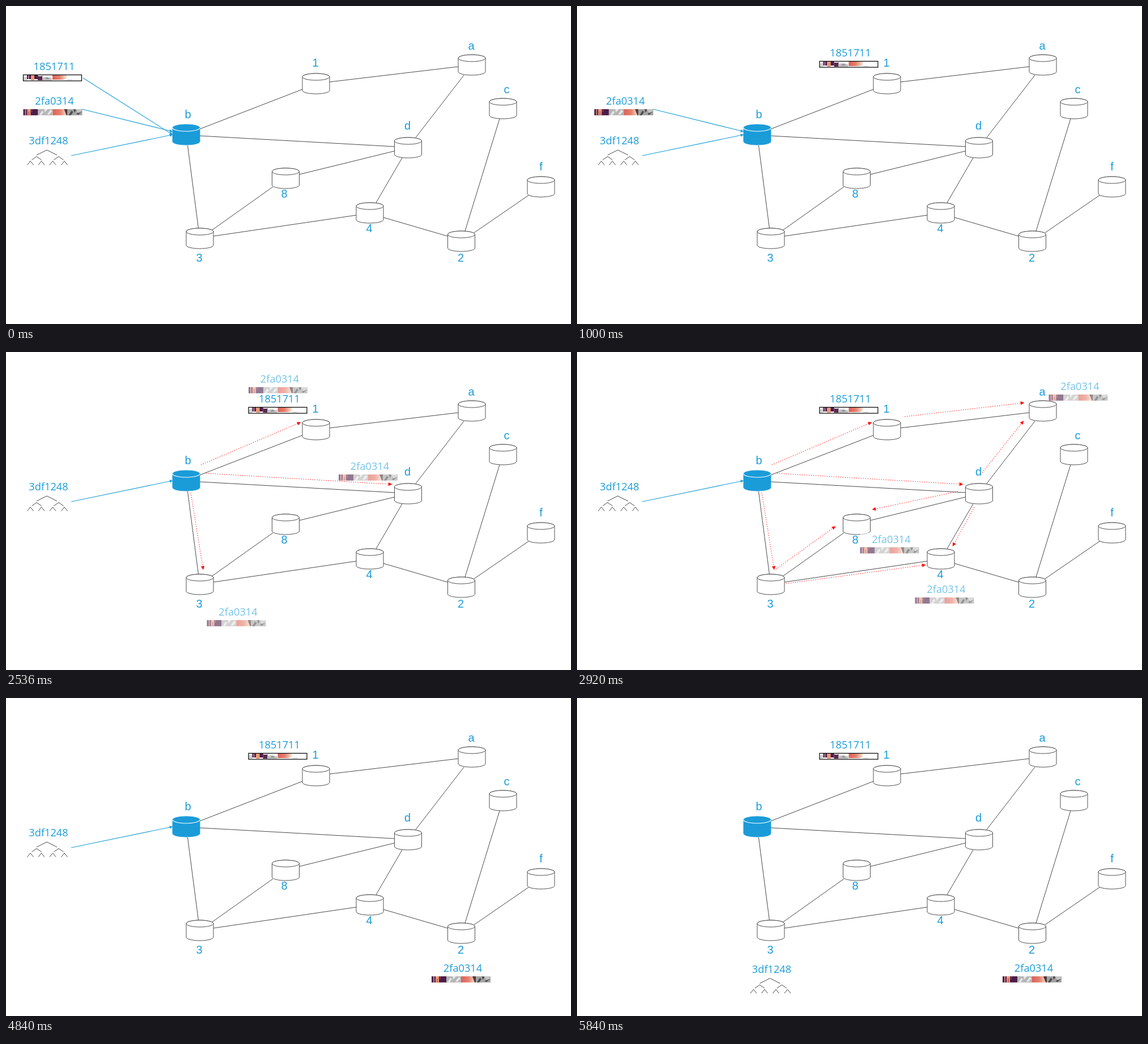
These frames come from a looping animation (997x561 px, 6800 ms). An HTML page:

```html
<!DOCTYPE html>
<html lang="en">
<head>
<meta charset="utf-8">
<title>Routing objects through a network</title>
<style>
  html, body { margin: 0; width: 100%; height: 100%; overflow: hidden; background: #fff; }
  svg { display: block; width: 100vw; height: 100vh; }
  text { fill: #1a9cd9; text-anchor: middle; }
  .name { font: 20px "Liberation Sans", Arial, sans-serif; }
  .hash { font: 18.2px "Open Sans", "Noto Sans", sans-serif; }
  .edge, .tree { fill: none; stroke: #484848; stroke-width: 1; }
  .disk { fill: #fff; stroke: #505050; stroke-width: 1; }
  .full { fill: #1a9cd9; stroke: #1a9cd9; }
  .rim { fill: none; stroke: #fff; stroke-width: 1.2; }
  .send { stroke: #1a9cd9; fill: #1a9cd9; }
  .hop { stroke: #f00; fill: #f00; }
</style>
</head>
<body>
<svg id="stage" viewBox="0 0 997 561">
  <defs>
    <linearGradient id="coral">
      <stop offset="0" stop-color="#db6156"/>
      <stop offset=".5" stop-color="#e5806f"/>
      <stop offset="1" stop-color="#f9e3cf"/>
    </linearGradient>
  </defs>
</svg>
<script>
const stage = document.getElementById("stage");
const LOOP = 6800;

function add(parent, tag, attrs, text) {
  const el = document.createElementNS("http://www.w3.org/2000/svg", tag);
  for (const key in attrs) el.setAttribute(key, attrs[key]);
  if (text) el.textContent = text;
  parent.append(el);
  return el;
}

const path = (g, cls, d) => add(g, "path", { class: cls, d });
const box = (g, x, y, width, height, fill) => add(g, "rect", { x, y, width, height, fill });
const label = (g, cls, x, y, text) => add(g, "text", { class: cls, x, y }, text);

// Part of the scene shown from one time to another
const parts = [];
function part(from, to, x = 0, y = 0, opacity = 1) {
  const el = add(stage, "g", { transform: `translate(${x} ${y})`, opacity });
  parts.push({ el, from, to });
  return el;
}

function arrow(g, cls, [x1, y1, x2, y2], size, dash) {
  const a = Math.atan2(y2 - y1, x2 - x1), c = Math.cos(a), s = Math.sin(a);
  const bx = x2 - size * c, by = y2 - size * s, w = size * 0.48;
  add(g, "line", { class: cls, x1, y1, x2: bx, y2: by, "stroke-width": 1.05, "stroke-dasharray": dash });
  add(g, "path", { class: cls, "stroke-width": 0.4,
    d: `M${x2} ${y2}L${bx - w * s} ${by + w * c}L${bx + w * s} ${by - w * c}Z` });
}

function disk(x, y, full) {
  const l = x - 24, r = x + 24, t = y + 6, b = y + 30;
  path(stage, full ? "disk full" : "disk", `M${l} ${t}A24 6 0 0 1 ${r} ${t}V${b}A24 6 0 0 1 ${l} ${b}Z`);
  path(stage, full ? "rim" : "disk", `M${l} ${t}A24 6 0 0 0 ${r} ${t}` + (full ? "" : `A24 6 0 0 0 ${l} ${t}`));
}

// Picture strips, origin at their top left corner
function plumTile(g, x) {
  box(g, x, 0, 26, 10.8, "#4b1d49");
  box(g, x + 3, 0, 2, 10.8, "#b78590");
  box(g, x + 7, 0, 6, 10.8, "#ef9a72");
  box(g, x + 9, 4, 2, 6.8, "#c95f5c");
  box(g, x + 14, 0, 2, 5, "#8a3553");
}

function greyTile(g, x, base, spots) {
  box(g, x, 0, 26, 10.8, base);
  path(g, "", `M${x + 2} 10.8l5-8 3 2-4 6zM${x + 11} 0h6l-5 6zM${x + 16} 9l6-8 3 3-6 6z`)
    .setAttribute("fill", spots);
}

function coralTile(g, x) {
  box(g, x, 0, 26, 10.8, "url(#coral)");
}

function fullStrip(g) {
  plumTile(g, 0);
  greyTile(g, 26, "#b5b5b5", "#e6e6e6");
  coralTile(g, 52);
  path(g, "", "M72 0h6v10.8h-2z").setAttribute("fill", "#4a3a3c");
  greyTile(g, 78, "#a2a2a2", "#4c4c4c");
  path(g, "", "M92 0h11v4l-6 3z").setAttribute("fill", "#c4c4c4");
}

function partStrip(g) {
  box(g, 0, 0, 103, 10.8, "#fff");
  box(g, 1, 4, 6, 6, "#d2d2d2");
  box(g, 7, 0, 7, 8, "#4b1d49");
  box(g, 9, 0, 2, 8, "#b78590");
  box(g, 14, 0, 6, 10, "#ef9a72");
  box(g, 20, 0, 6, 8, "#4b1d49");
  box(g, 26, 2, 8, 8, "#5b2750");
  box(g, 27, 0, 6, 3, "#eee");
  path(g, "", "M34 5l8-1 9 2v4.500H34z").setAttribute("fill", "#c3c3c3");
  path(g, "", "M38 8l5-3 4 3z").setAttribute("fill", "#8d8d8d");
  path(g, "", "M52 0h25v7l-6 2H52z").setAttribute("fill", "url(#coral)");
  box(g, 78, 8, 9, 2, "#ddd");
  add(g, "rect", { x: 0.5, y: 0.5, width: 103, height: 10.6, fill: "none", stroke: "#000", "stroke-width": 1.2 });
}

function whole(from, to, x, y, opacity) {
  const g = part(from, to, x, y, opacity);
  box(g, 0, -26, 103, 37, "#fff");
  label(g, "hash", 55, -8, "2fa0314");
  fullStrip(g);
}

function partial(from, to, x, y) {
  const g = part(from, to, x, y);
  label(g, "hash", 55, -8, "1851711");
  partStrip(g);
}

function tree(from, to, x, y) {
  const g = part(from, to, x, y);
  const roof = (cx, cy, w, h) => `M${cx - w} ${cy + h}L${cx} ${cy}L${cx + w} ${cy + h}`;
  label(g, "hash", 3, -10, "3df1248");
  path(g, "tree", roof(0, 0, 18, 9) + [-18, 21].map(cx => roof(cx, 11.5, 8.5, 6)).join("") +
    [-29, -9.5, 10.5, 31].map(cx => roof(cx, 19.5, 5.5, 7)).join(""));
}

// Network
path(stage, "edge", `M342 217L523 147M571 134L798 107M342 229L685 248M723 232L808 122
  M685 256L518 297M699 268L653 347M471 319L364 395M366 406L618 369M666 373L779 406
  M810 397L871 199M826 400L922 334M320.500 246L339.500 392`);

// name, disk centre and top, label position
[
  ["1", 547, 119, 546, 107], ["a", 822, 86, 821, 77], ["c", 877, 163, 883.5, 154],
  ["b", 318, 209, 321, 198], ["d", 709.5, 232, 708.5, 218], ["f", 944, 301, 944, 290],
  ["8", 493.5, 286, 491, 338], ["4", 642, 347, 641, 399],
  ["3", 342, 392, 341, 451], ["2", 803.5, 397, 802.5, 451]
].forEach(([name, x, y, lx, ly]) => {
  disk(x, y, name === "b");
  label(stage, "name", lx, ly, name);
});

// Requests arriving at b
[[1000, 136, 127, 294, 227], [1960, 134, 182, 294, 221.5], [5840, 115, 264, 294, 227]]
  .forEach(([to, ...line]) => arrow(part(0, to), "send", line, 5));

// Forwarding hops
[
  [1960, 344, 199, 520, 124], [1960, 353, 214, 681, 233.5], [1960, 326, 248, 348, 384],
  [2920, 578, 114, 789, 89.5], [2920, 715, 213, 788, 121.5], [2920, 672, 246, 521, 278],
  [2920, 701, 274, 663, 342.5], [2920, 351, 383, 456, 307.5], [2920, 369, 408.5, 615, 375.5],
  [3880, 668, 375, 768.5, 409]
].forEach(([from, ...line]) => arrow(part(from, 4840), "hop", line, 6, "1.3 2.7"));

partial(0, 1000, 30, 121);
partial(1000, LOOP, 427.5, 97);

whole(0, 1960, 30.5, 182);
[[428, 62], [587, 216], [354.5, 473]].forEach(p => whole(1960, 2920, ...p, 0.6));
[[832.5, 75], [499.5, 344.5], [596.5, 433]].forEach(p => whole(2920, 3880, ...p, 0.6));
whole(3880, LOOP, 751, 491);

tree(0, 5840, 72, 254);
tree(5840, LOOP, 340.5, 494.5);

function draw(t) {
  for (const { el, from, to } of parts)
    el.style.display = t >= from && t < to ? "" : "none";
}

const start = performance.now();
function tick() {
  draw((performance.now() - start) % LOOP);
  requestAnimationFrame(tick);
}
tick();
</script>
</body>
</html>
```
